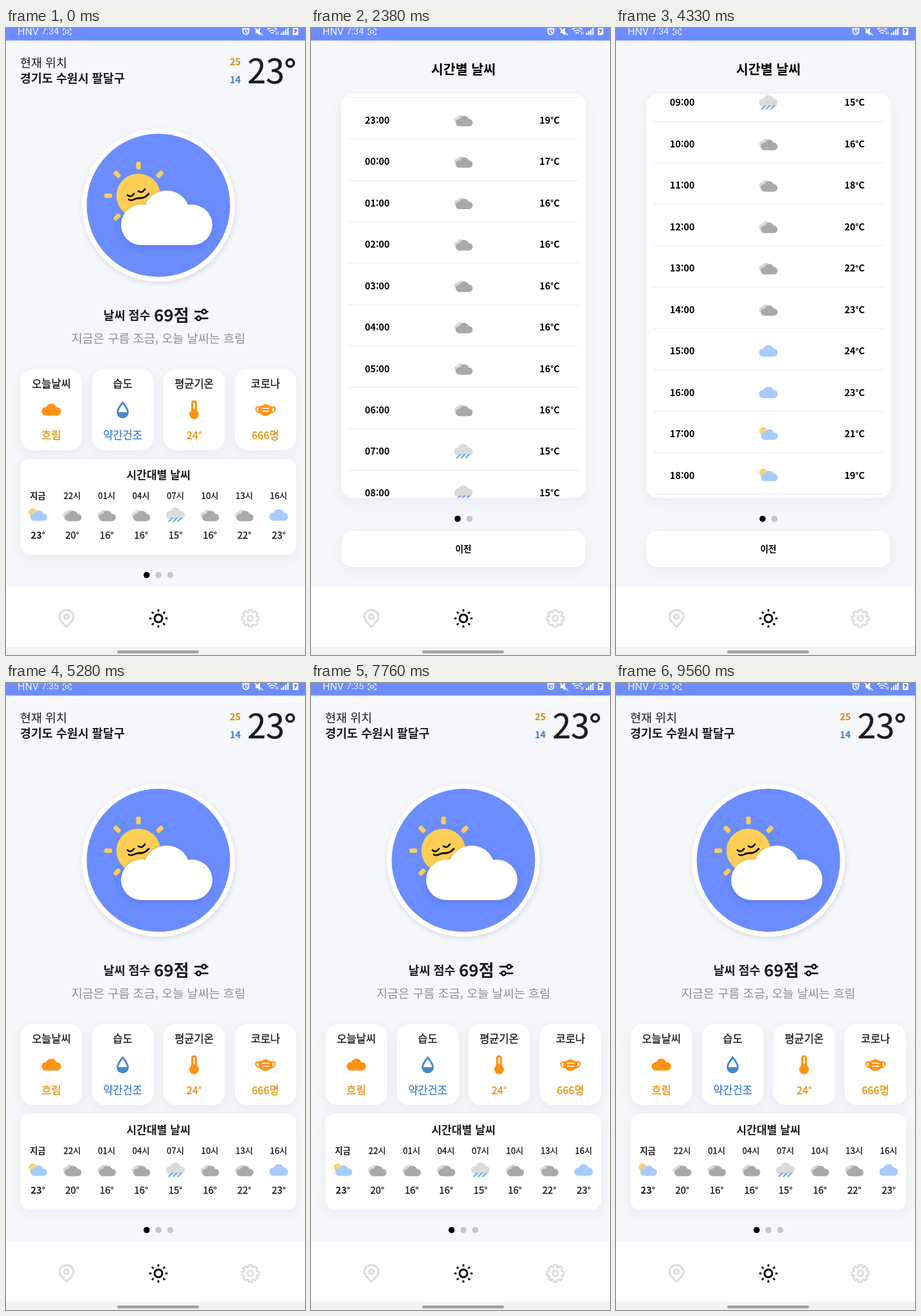
Animation of 465 by 976 pixels, one loop 9.63 s. Source, as an HTML page:

```html
<!DOCTYPE html>
<html lang="ko">
<head>
<meta charset="utf-8">
<style>
html, body { margin: 0; width: 100%; height: 100%; overflow: hidden; background: #f5f7fa; }
svg { display: block; width: 465px; height: 976px; font-family: "Noto Sans CJK KR", "Noto Sans KR", "Noto Sans CJK", "Noto Sans", sans-serif; font-variant-ligatures: no-contextual; }
.card { fill: #fff; filter: drop-shadow(0 5px 9px rgba(70, 85, 120, .08)); }
.line { fill: none; stroke-linecap: round; stroke-linejoin: round; }
</style>
</head>
<body>
<svg id="stage" viewBox="0 0 465 976"></svg>
<script>
const LOOP = 9630, OPEN_AT = 540, CLOSE_AT = 5000;
const ROW = 64.45;
const ORANGE = '#ff9315', BLUE = '#6b8dff', SKY = '#a8cbfd', INK = '#1b1c20';

// Medium weight is a regular face with a hairline stroke; the degree sign is set small and raised.
const text = (s, x, y, size, { weight = 400, fill = INK, anchor = 'middle' } = {}) => {
  const body = s.replace(/°(.*)/, '<tspan font-family="Noto Sans, sans-serif" font-size=".75em" dy="-.24em">°</tspan><tspan dy=".18em">$1</tspan>');
  const medium = weight === 500 ? `stroke="${fill}" stroke-width=".35"` : '';
  return `<text x="${x}" y="${y}" font-size="${size}" font-weight="${medium ? 400 : weight}" fill="${fill}" text-anchor="${anchor}" ${medium}>${body}</text>`;
};
const rect = (x, y, w, h, r, attrs) => `<rect x="${x}" y="${y}" width="${w}" height="${h}" rx="${r}" ${attrs}/>`;
const circle = (x, y, r, attrs) => `<circle cx="${x}" cy="${y}" r="${r}" ${attrs}/>`;
const ring = (x, y, r, color, width) => circle(x, y, r, `fill="none" stroke="${color}" stroke-width="${width}"`);
const stroke = (d, color, width) => `<path class="line" d="${d}" stroke="${color}" stroke-width="${width}"/>`;
const at = (x, y, body, more = '') => `<g transform="translate(${x} ${y}) ${more}">${body}</g>`;
const repeat = (n, fn) => Array.from({ length: n }, (_, i) => fn(i)).join('');

const cloud = (x, y, scale, fill) => at(x, y,
  `<g fill="${fill}">${rect(-14.5, -3.8, 29, 12.8, 6.4, '')}${circle(0, -1, 8, '')}</g>`,
  `scale(${scale})`);

const icons = {
  part: circle(-8, -4, 6.3, 'fill="#f8d37f"') + cloud(1.5, 1.2, .9, SKY),
  gray: cloud(-4, -1.7, .72, '#d9d9d9') + cloud(1.2, 1.6, .91, '#a9a9a9'),
  rain: cloud(0, -2.5, 1, '#dbdbdb') + stroke('M-10 10l5-5M-3 10l5-5M4 10l5-5', '#7fa4e8', 2.4),
  blue: cloud(0, 0, 1, SKY)
};

const dots = (x, y, n) => repeat(n, i => circle(x + i * 18.4, y, 4.8, `fill="${i ? '#c5c6ca' : '#000'}"`));

function statusBar() {
  const white = '#fff';
  return rect(0, 0, 465, 19.5, 0, `fill="${BLUE}"`) +
    `<g font-family="Roboto, sans-serif" fill="#eef2ff">
      <text x="18" y="11" font-size="16">HNV</text>
      <text id="clock" x="55" y="10" font-size="14"></text></g>` +
    stroke('M89 4V1.5h3M98 1.5h3V4M89 8v2.5h3M98 10.5h3V8', white, 1.2) +
    rect(92.5, 4, 5, 4, 1, 'fill="none" stroke="#fff" stroke-width="1.2"') +
    ring(373, 5.5, 4.5, white, 1.8) +
    stroke('M373 3v3l2 1M367.5 2l2-2M378.5 2l-2-2', white, 1.4) +
    `<path d="M388 3h3l4-4v13l-4-4h-3z" fill="#fff"/>` + stroke('M387 0l12 11', white, 1.6) +
    stroke('M407 2q7-5 14 0M409.5 5q4.5-3.5 9 0M412 8q2-1.6 4 0', white, 1.6) +
    stroke('M420.5 10V6M423 6v4', white, 1) +
    repeat(4, i => rect(427.5 + i * 3.3, 7.5 - i * 2.6, 2.2, 3.5 + i * 2.6, 0, 'fill="#fff"')) +
    rect(446, 0, 8.5, 11, 1.5, 'fill="#fff"') + stroke('M448 3h4l-3 5', '#40507f', 1.3);
}

function gearPath() {
  const points = [];
  for (let i = 0; i < 8; i++) {
    [[-.3, 10.6], [-.19, 13.4], [.19, 13.4], [.3, 10.6]].forEach(([offset, r]) => {
      const a = i * Math.PI / 4 + offset;
      points.push(`${(r * Math.cos(a)).toFixed(2)} ${(r * Math.sin(a)).toFixed(2)}`);
    });
  }
  return `M${points.join('L')}Z`;
}

function navBar() {
  const pale = '#dcdcdd';
  return rect(0, 870, 465, 94, 0, 'fill="#fefefe"') + rect(0, 963, 465, 13, 0, 'fill="#f2f2f2"') +
    rect(173, 969, 127, 4.4, 2.2, 'fill="#a0a0a0"') +
    stroke('M94 932C88 926 83 922 83 916.5a11 10.5 0 0 1 22 0C105 922 100 926 94 932Z', pale, 2.9) +
    ring(94, 916.5, 3.5, pale, 2.8) +
    at(237, 919, ring(0, 0, 6, '#000', 2.9) +
      repeat(8, i => `<path class="line" d="M0-12v-1" stroke="#000" stroke-width="3" transform="rotate(${i * 45})"/>`)) +
    at(380, 919, stroke(gearPath(), pale, 2.8) + ring(0, 0, 4.3, pale, 2.8));
}

function hero() {
  const rays = [180, 225, 270, 315, 135].map(a =>
    rect(41, -3.5, 12, 7, 2.8, `fill="#ffcf55" transform="rotate(${a})"`)).join('');
  return circle(237, 276, 119, 'fill="#fff" style="filter:drop-shadow(1px 3px 4px rgba(60,70,100,.15))"') +
    circle(237, 276, 111.5, `fill="${BLUE}"`) +
    at(206, 261, circle(0, 0, 34.3, 'fill="#ffcf55"') + rays) +
    stroke('M189 260q5 5 10-2M206 254q5 4 10-3M191 267c5 4 8-2 14-2s11 0 17-7', '#111', 2.8) +
    `<g fill="#fff" style="filter:drop-shadow(0 4px 6px rgba(40,60,160,.22))">
      ${rect(179, 275, 142, 63, 31.5, '')}${circle(250, 289, 36, '')}</g>`;
}

const cardIcons = [
  cloud(0, 0, 1.04, ORANGE),
  `<path d="M0-11C-5-5-8-1-8 4A8 8 0 0 0 8 4C8-1 5-5 0-11Z" fill="none" stroke="#4589cc" stroke-width="2.8"/>
   <path d="M-8 4H8A8 8 0 0 1-8 4Z" fill="#4589cc"/>`,
  rect(-4.5, -14.5, 9, 22, 4.5, `fill="${ORANGE}"`) + circle(0, 7.5, 7.5, `fill="${ORANGE}"`) +
    stroke('M0-10v8', '#fff', 2.4),
  stroke('M-10-4h-2q-3 0-3 3 0 4 6 6M10-4h2q3 0 3 3 0 4-6 6', ORANGE, 2) +
    `<path d="M-11-5Q-5-5.500 0-9Q5-5.500 11-5V2Q8 9 0 10Q-8 9-11 2Z" fill="${ORANGE}"/>` +
    stroke('M-5-2H5M-5 2.5H5', '#fff', 1.7)
];

function home() {
  const cards = [['오늘날씨', '흐림'], ['습도', '약간건조'], ['평균기온', '24°'], ['코로나', '666명']];
  const hours = ['지금', '22시', '01시', '04시', '07시', '10시', '13시', '16시'];
  const temps = [23, 20, 16, 16, 15, 16, 22, 23];
  const kinds = ['part', 'gray', 'gray', 'gray', 'rain', 'gray', 'gray', 'blue'];
  const left = { anchor: 'start' }, leftBold = { anchor: 'start', weight: 700 };
  return text('현재 위치', 22, 60.5, 18.4, left) +
    text('경기도 수원시 팔달구', 22, 85, 18.4, leftBold) +
    text('25', 356.5, 58, 14.6, { weight: 700, fill: '#d58c1c' }) +
    text('14', 356.5, 86, 14.6, { weight: 700, fill: '#3f83c6' }) +
    text('23', 375.5, 86, 52, { anchor: 'start', weight: 500 }) +
    ring(442, 54.5, 5.7, INK, 3.7) +
    hero() +
    text('날씨 점수', 151.5, 453.5, 18.4, leftBold) +
    text('69점', 230, 456.5, 26, leftBold) +
    stroke('M294 441.5h10M312 441.5h1.5M294 452h1.500M303.500 452h10', '#000', 2.4) +
    ring(308, 441.5, 3.2, '#000', 2.4) +
    ring(299.5, 452, 3.2, '#000', 2.4) +
    text('지금은 구름 조금, 오늘 날씨는 흐림', 237, 490, 18.6, { fill: '#8f9094' }) +
    cards.map(([title, value], i) => {
      const x = 70.5 + i * 111;
      return rect(x - 48, 531, 96, 126, 20, 'class="card"') + text(title, x, 560, 16.5, { weight: 500 }) +
        at(x, 594, cardIcons[i]) +
        text(value, x, 639.5, 16.5, { weight: 500, fill: i === 1 ? '#3f83cf' : '#e5930f' });
    }).join('') +
    rect(22.5, 671, 429, 149, 14, 'class="card"') +
    text('시간대별 날씨', 237, 702, 17.2, { weight: 700 }) +
    hours.map((hour, i) => {
      const x = 49.5 + i * 53.5, weight = i ? 500 : 700;
      return text(hour, x, 733, 13.2, { weight }) + at(x, 758, icons[kinds[i]]) +
        text(temps[i] + '°', x, 794.5, 15, { weight });
    }).join('') +
    dots(218.7, 851.5, 3);
}

function hourly() {
  const temps = [23, 22, 21, 20, 19, 17, 16, 16, 16, 16, 16, 16, 15, 15, 15, 16, 18, 20, 22, 23, 24, 23, 21, 19];
  const kind = i => i === 0 || i > 21 ? 'part' : i > 19 ? 'blue' : i > 11 && i < 15 ? 'rain' : 'gray';
  const bold = { weight: 700, fill: '#000' };
  const rows = temps.map((temp, i) => {
    const y = 132 + i * ROW, hour = String((19 + i) % 24).padStart(2, '0');
    return text(hour + ':00', 103, y + 5.5, 14.4, bold) + at(237, y, icons[kind(i)]) +
      text(temp + '°C', 371, y + 5.5, 14.6, bold) +
      rect(58, y + 29, 358, 1, 0, 'fill="#ebebed"');
  }).join('');
  return text('시간별 날씨', 237, 71.5, 20.6, bold) +
    rect(47, 103, 380.5, 628.5, 18, 'class="card"') +
    `<clipPath id="window">${rect(47, 103, 380.5, 628.5, 18, '')}</clipPath>
     <g clip-path="url(#window)"><g id="rows">${rows}</g></g>` +
    dots(228, 764, 2) +
    rect(47.5, 783, 379, 56, 16, 'class="card"') + text('이전', 237, 816, 13.6, bold);
}

const stage = document.getElementById('stage');
stage.innerHTML = rect(0, 0, 465, 976, 0, 'fill="#f5f7fa"') +
  `<g id="home">${home()}</g><g id="hourly">${hourly()}</g>` + navBar() + statusBar();
const [homeView, hourlyView, rows, clock] =
  ['home', 'hourly', 'rows', 'clock'].map(id => document.getElementById(id));

// Each swipe: start, end, distance, easing.
const smooth = u => u * u * (3 - 2 * u);
const easeOut = u => 1 - (1 - u) ** 3;
const swipes = [[1620, 2660, 300, smooth], [2730, 3760, 343, smooth], [3830, 4330, 275.3, easeOut]];
const scrollAt = t => swipes.reduce((sum, [from, to, distance, ease]) =>
  sum + distance * ease(Math.min(1, Math.max(0, (t - from) / (to - from)))), 0);

function draw(t) {
  const open = t >= OPEN_AT && t < CLOSE_AT;
  homeView.style.display = open ? 'none' : '';
  hourlyView.style.display = open ? '' : 'none';
  rows.setAttribute('transform', `translate(0 ${-scrollAt(t).toFixed(2)})`);
  clock.textContent = t < CLOSE_AT ? '7:34' : '7:35';
}

let start;
function tick(now) {
  start ??= now;
  draw((now - start) % LOOP);
  requestAnimationFrame(tick);
}
draw(0);
requestAnimationFrame(tick);
</script>
</body>
</html>
```
